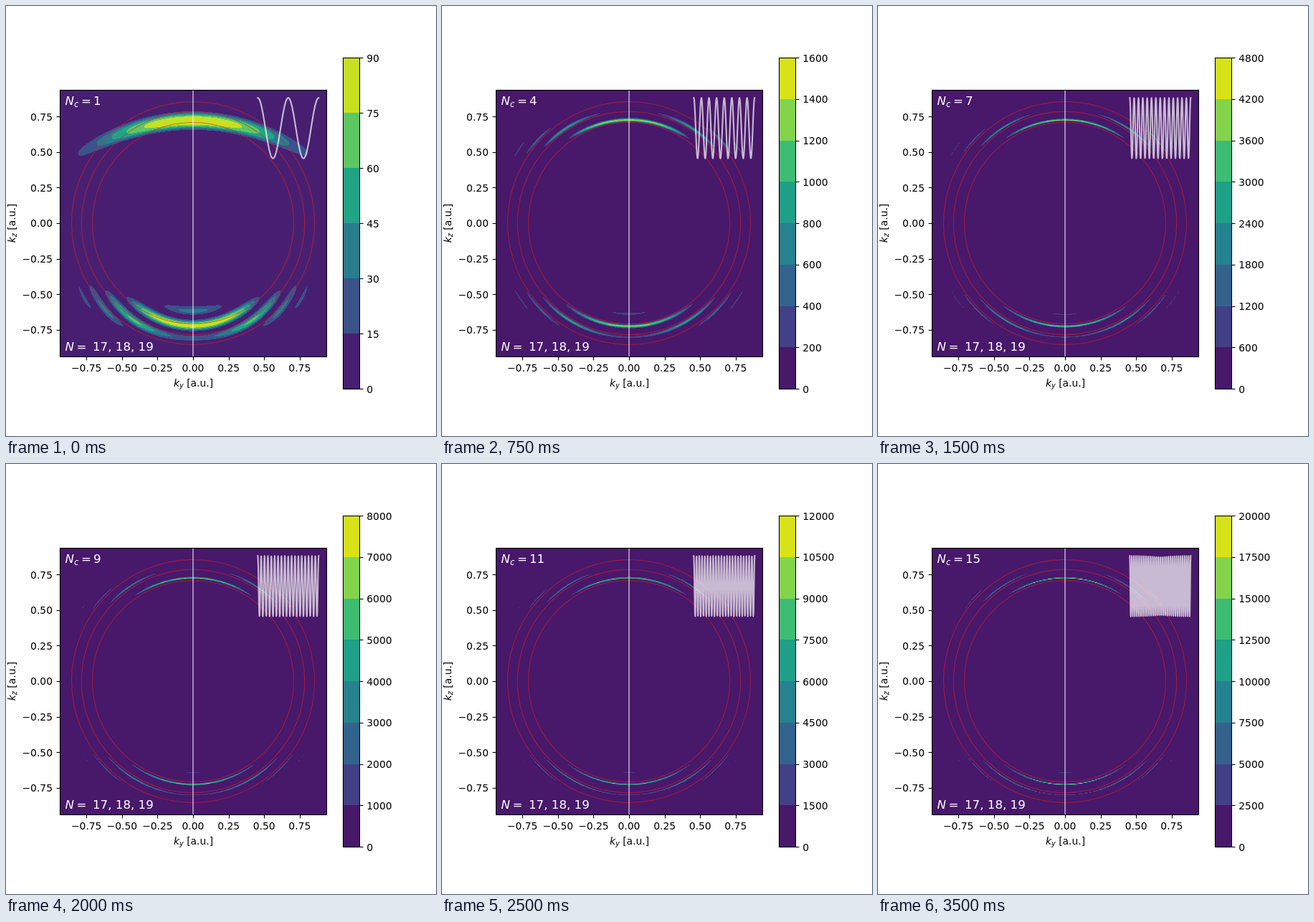
An HTML page with a canvas that plays this animation: 600 px wide and 600 px high, repeating every 3.75 s.

```html
<!DOCTYPE html>
<html lang="en">
<head>
<meta charset="utf-8">
<title>Momentum distribution by cycle count</title>
<style>
  html, body { margin: 0; width: 100%; height: 100%; overflow: hidden; background: #fff; }
  #stage { position: relative; width: 600px; height: 600px; }
  canvas { position: absolute; left: 75px; top: 117px; }
  svg { position: absolute; left: 0; top: 0; }
  text { font: 13.89px "DejaVu Sans", sans-serif; white-space: pre; }
  .note text { font-size: 16.67px; fill: #fff; }
  text.i, tspan.i { font-style: italic; }
  tspan.sub { font-style: italic; font-size: 9.72px; }
  .note .sub { font-size: 11.67px; }
  .axis { stroke: #000; stroke-width: 1.1; fill: none; }
  .ring { stroke: rgba(220, 30, 40, .58); fill: none; stroke-width: 1.1; }
</style>
</head>
<body>
<div id="stage">
  <canvas id="map" width="372" height="372"></canvas>
  <svg width="600" height="600" viewBox="0 0 600 600">
    <g id="rings"></g>
    <path d="M261 117V489" stroke="#fff" stroke-opacity=".5" stroke-width="2"/>
    <path id="wave" fill="none" stroke="#fff" stroke-opacity=".7" stroke-width="2.08"
      stroke-linejoin="round" stroke-linecap="square"/>
    <g class="note">
      <text x="82.5" y="138"><tspan class="i">N</tspan><tspan class="sub" dy="2.5">c</tspan></text>
      <text x="105" y="138">=</text>
      <text x="122" y="138" id="count"></text>
      <text x="82.5" y="481" class="i">N</text>
      <text x="98.5" y="481">=</text>
      <text x="121" y="481">17, 18, 19</text>
    </g>
    <g id="axes"></g>
    <g id="bar"></g>
  </svg>
</div>
<script>
const $ = id => document.getElementById(id);
const STEP_MS = 250, STEPS = 15;
const SIZE = 372, GRID = 300, CELL = SIZE / (GRID - 1);
const PEAK = 88.2;                    // strongest signal of one cycle
const RING = 20764, PERIOD = 4487;    // energy ladder in squared pixels
const NICE = [1, 1.5, 2, 2.5, 3, 4, 5, 6, 8, 10];
const PALETTES = {
  6: ['#481f70', '#3b528b', '#287c8e', '#20a486', '#5dc863', '#c8e020'],
  7: ['#481a6c', '#3f4788', '#2e6e8e', '#21918c', '#2fb47c', '#74d055', '#d2e21b'],
  8: ['#48186a', '#424086', '#33638d', '#26828e', '#1fa088', '#3fbc73', '#84d44b', '#d8e219']
};

const bump = (d, width, power) => Math.exp(-Math.pow(Math.abs(d / width), power));

// Signal of a single cycle; x and z in pixels from the centre.
function singleCycle(x, z) {
  const a = Math.abs(z), d = a - 143 + 0.0018 * x * x;
  const side = PEAK * bump(x, 130.5, 2.8);
  if (z > 0) return side * bump(d, 10.6, 3);
  const fringe = Math.cos(Math.PI * (x * x + (a - 25) ** 2 - 13924) / 5200);
  return side * bump(d + 3, 20, 3.2) * fringe * fringe;
}

// Interference of n cycles.
function grating(r2, n) {
  const p = Math.PI * (r2 - RING) / PERIOD, s = Math.sin(p);
  return Math.abs(s) < 1e-6 ? n * n : (Math.sin(n * p) / s) ** 2;
}

const base = new Float32Array(GRID * GRID), radius2 = new Float32Array(GRID * GRID);
for (let j = 0, k = 0; j < GRID; j++) {
  for (let i = 0; i < GRID; i++, k++) {
    const x = i * CELL - SIZE / 2, z = SIZE / 2 - j * CELL;
    base[k] = singleCycle(x, z);
    radius2[k] = x * x + z * z;
  }
}

function scale(n) {
  const max = PEAK * n * n, raw = max / 8;
  const mag = 10 ** Math.floor(Math.log10(raw));
  const step = mag * NICE.find(v => v * mag >= raw);
  return { step, bins: Math.ceil(max / step) };
}

const images = [];
function contour(n) {
  if (images[n]) return images[n];
  const { step, bins } = scale(n);
  const rgb = PALETTES[bins].map(c => [1, 3, 5].map(p => parseInt(c.slice(p, p + 2), 16)));
  const f = base.map((v, k) => v * grating(radius2[k], n) / step);
  const img = new ImageData(SIZE, SIZE);
  for (let y = 0, o = 0; y < SIZE; y++) {
    const gy = (y + 0.5) / CELL, j = Math.floor(gy), v = gy - j;
    for (let x = 0; x < SIZE; x++, o += 4) {
      const gx = (x + 0.5) / CELL, i = Math.floor(gx), u = gx - i;
      const k = j * GRID + i;
      const top = f[k] + (f[k + 1] - f[k]) * u;
      const low = f[k + GRID] + (f[k + GRID + 1] - f[k + GRID]) * u;
      const level = Math.min(bins - 1, Math.floor(top + (low - top) * v));
      img.data.set(rgb[level], o);
      img.data[o + 3] = 255;
    }
  }
  return images[n] = img;
}

function wave(n) {
  const points = [];
  for (let i = 0; i < 300; i++) {
    const t = i / 299;
    points.push((351.3 + 85 * t).toFixed(2) + ' ' +
      (170.4 - 42.2 * Math.cos(4 * Math.PI * n * t)).toFixed(2));
  }
  return 'M' + points.join('L');
}

const label = (x, y, s, anchor) => `<text x="${x}" y="${y}" text-anchor="${anchor}">${s}</text>`;
const tick = d => `<path class="axis" d="${d}"/>`;
const snap = v => Math.round(v) + 0.5;

function drawAxes() {
  let out = '<rect class="axis" x="75.5" y="117.5" width="372" height="372"/>';
  for (let i = -3; i <= 3; i++) {
    const s = (i < 0 ? '\u2212' : '') + Math.abs(i / 4).toFixed(2);
    const x = 261 + i * 49.6, y = 303 - i * 49.6;
    out += tick(`M${snap(x)} 489.5v5`) + label(x, 510, s, 'middle');
    out += tick(`M75.5 ${snap(y)}h-5`) + label(65, y + 5.3, s, 'end');
  }
  const title = (place, sub) => `<text ${place} text-anchor="middle"><tspan class="i">k</tspan>` +
    `<tspan class="sub" dy="2.2">${sub}</tspan><tspan dy="-2.2"> [a.u.]</tspan></text>`;
  out += title('x="261.5" y="531"', 'y');
  out += title('transform="translate(12.5 303) rotate(-90)"', 'z');
  $('axes').innerHTML = out;
  $('rings').innerHTML = [0, 1, 2].map(i =>
    `<circle class="ring" cx="261" cy="303" r="${Math.sqrt(19750 + PERIOD * i)}"/>`).join('');
}

function drawBar(n) {
  const { step, bins } = scale(n), h = 462 / bins;
  let fills = '', marks = '';
  for (let i = 0; i <= bins; i++) {
    const y = 534 - i * h;
    if (i < bins) {
      fills += `<rect x="470" y="${y - h}" width="24" height="${h}" fill="${PALETTES[bins][i]}" shape-rendering="crispEdges"/>`;
    }
    marks += tick(`M493.5 ${snap(y)}h5`) + label(503.3, y + 5.6, Math.round(i * step), 'start');
  }
  $('bar').innerHTML = fills + '<rect class="axis" x="470.5" y="72.5" width="23" height="462"/>' + marks;
}

const ctx = $('map').getContext('2d');
let shown = 0;
function show(n) {
  if (n === shown) return;
  shown = n;
  ctx.putImageData(contour(n), 0, 0);
  $('wave').setAttribute('d', wave(n));
  $('count').textContent = n;
  drawBar(n);
}

drawAxes();
show(1);
let start;
function frame(t) {
  start ??= t;
  show(Math.floor((t - start) / STEP_MS) % STEPS + 1);
  requestAnimationFrame(frame);
}
requestAnimationFrame(frame);
</script>
</body>
</html>
```
